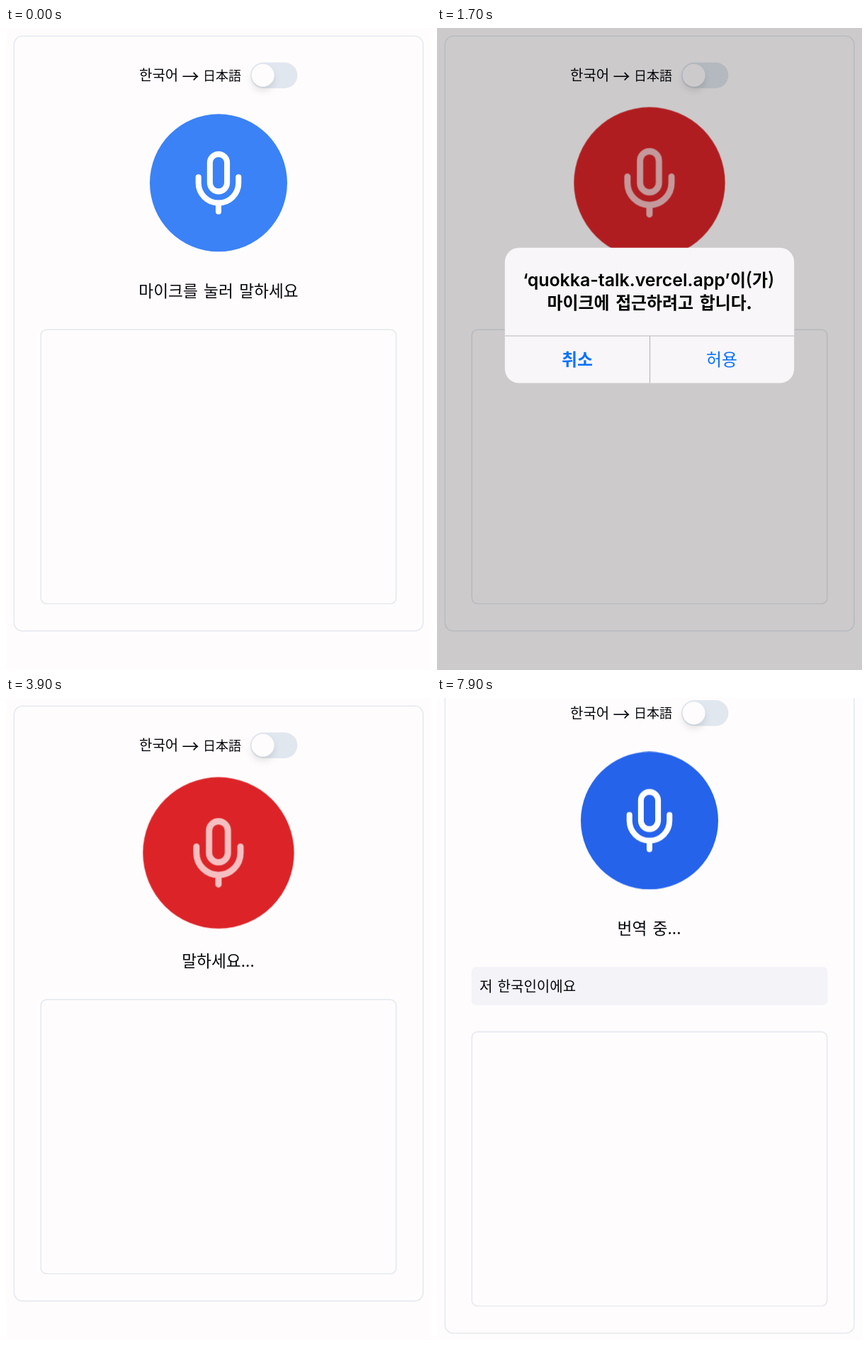
Animation, 600 px wide and 905 px high, one loop 8000 ms. Source, as an HTML page:

```html
<!DOCTYPE html>
<html lang="ko">
<head>
<meta charset="utf-8">
<title>Voice translator</title>
<style>
  html, body { margin: 0; width: 100%; height: 100%; overflow: hidden; background: #fffcfd; }
  svg { display: block; width: 600px; height: 905px; }
  text { font-family: "Noto Sans CJK KR", "Noto Sans KR", "Noto Sans CJK", "Noto Sans CJK JP", sans-serif; fill: #05060c; }
  .mid { text-anchor: middle; }
  .label { font-size: 20px; font-weight: 500; }
  .label-ja { font-size: 18px; font-weight: 500; }
  .arrow { font-size: 24px; }
  .status { font-size: 22.7px; word-spacing: 2px; }
  .words { font-size: 20px; word-spacing: 1.6px; }
  .frame { fill: none; stroke: #e2e7ee; stroke-width: 1.4; }
  .knob { filter: drop-shadow(0 6px 5px rgba(0, 0, 0, .1)); }

  .alert text { font-size: 23.9px; word-spacing: 2px; font-weight: 600; fill: #000; }
  .alert .host { font-family: Inter, sans-serif; font-size: 24.9px; }
  .alert .action { fill: #0a72ff; }
  .alert .plain { font-weight: 400; }
  .rule { stroke: #bab9be; stroke-width: 1.2; }

  /* One loop is 8 s, so 1% is 80 ms. */
  .page, .card, .result, .transcript, .late, .idle, .listening, .translating {
    animation: 8s step-end infinite;
  }
  .page { animation-name: rise; }
  .card { animation-name: grow; }
  .result { animation-name: push; }
  .transcript { animation-name: show-box; }
  .han { animation-name: show-han; }
  .gugin { animation-name: show-gugin; }
  .ending { animation-name: show-ending; }
  .idle { animation-name: idle; }
  .listening { animation-name: listening; }
  .translating { animation-name: translating; }
  .button { transform-origin: 300px 218.3px; animation: swell 8s ease infinite; }
  .disc { animation: tint 8s ease infinite; }
  .mic { animation: mic 8s ease infinite; }
  .dim { animation: fade 8s ease infinite; }
  .alert { transform-origin: 300px 405.2px; animation: fade 8s ease infinite, settle 8s ease infinite; }

  @keyframes rise { 0% { transform: none; } 52.5%, 100% { transform: translateY(-45.5px); } }
  @keyframes grow { 0% { height: 838.6px; } 52.5%, 100% { height: 929.6px; } }
  @keyframes push { 0% { transform: none; } 52.5%, 100% { transform: translateY(91px); } }
  @keyframes show-box { 0% { visibility: hidden; } 52.5%, 100% { visibility: visible; } }
  @keyframes show-han { 0% { visibility: hidden; } 55%, 100% { visibility: visible; } }
  @keyframes show-gugin { 0% { visibility: hidden; } 57.5%, 100% { visibility: visible; } }
  @keyframes show-ending { 0% { visibility: hidden; } 62.5%, 100% { visibility: visible; } }
  @keyframes idle {
    0%, 82.5% { visibility: visible; }
    12.5%, 86.25%, 100% { visibility: hidden; }
  }
  @keyframes listening {
    0%, 82.5%, 100% { visibility: hidden; }
    12.5% { visibility: visible; }
  }
  @keyframes translating { 0% { visibility: hidden; } 86.25%, 100% { visibility: visible; } }
  @keyframes swell {
    0%, 12.5%, 86.25%, 100% { transform: scale(1); }
    16.25%, 82.5% { transform: scale(1.1); }
  }
  @keyframes tint {
    0%, 8.75% { fill: #3b82f6; }
    11.25%, 12.5%, 86.25%, 100% { fill: #2563eb; }
    16.25%, 82.5% { fill: #dc2428; }
  }
  @keyframes mic {
    0%, 12.5%, 86.25%, 100% { stroke: #fff; }
    16.25%, 82.5% { stroke: #f5bfc1; }
  }
  @keyframes fade {
    0%, 15.75%, 31.4%, 100% { opacity: 0; }
    20.75%, 26.4% { opacity: 1; }
  }
  @keyframes settle {
    0%, 15.75% { transform: scale(1.2); }
    20.75%, 100% { transform: scale(1); }
  }
</style>
</head>
<body>
<svg viewBox="0 0 600 905">
  <rect width="600" height="905" fill="#fffcfd"/>

  <g class="page">
    <rect class="card frame" x="11.3" y="11.4" width="577.6" height="838.6" rx="12"/>

    <text class="label" x="188" y="74">한국어</text>
    <text class="arrow mid" x="260.5" y="77">→</text>
    <text class="label-ja" x="278" y="73.8" lang="ja">日本語</text>
    <rect x="345" y="48.5" width="66.4" height="36.5" rx="18.25" fill="#e1e7ef"/>
    <circle class="knob" cx="362.6" cy="66.8" r="16" fill="#fffcfd"/>

    <g class="button">
      <circle class="disc" cx="300" cy="218.3" r="97"/>
      <g class="mic" transform="translate(251.5 169.8) scale(4.04)" fill="none" stroke-width="2" stroke-linecap="round" stroke-linejoin="round">
        <rect x="9" y="2" width="6" height="13" rx="3"/>
        <path d="M19 10v2a7 7 0 0 1-14 0v-2M12 19v3"/>
      </g>
    </g>

    <text class="status mid idle" x="300" y="378.5">마이크를 눌러 말하세요</text>
    <text class="status mid listening" x="299.5" y="378.5">말하세요...</text>
    <text class="status mid translating" x="299.5" y="378.5">번역 중...</text>

    <g class="transcript">
      <rect x="48.5" y="424.5" width="503" height="54" rx="7" fill="#f3f3f8"/>
      <text class="words" x="60" y="459">저<tspan class="late han"> 한</tspan><tspan class="late gugin">국인</tspan><tspan class="late ending">이에요</tspan></text>
    </g>

    <g class="result">
      <rect class="frame" x="49.2" y="425.2" width="501.6" height="386.4" rx="8"/>
    </g>
  </g>

  <rect class="dim" width="600" height="905" fill="#000" fill-opacity=".2"/>

  <g class="alert">
    <rect x="95.8" y="309.8" width="408.4" height="190.8" rx="20" fill="#f8f6f8"/>
    <path class="rule" d="M95.8 434H504.2M300.5 434V500.6"/>
    <text class="host mid" x="267.5" y="364">‘quokka-talk.vercel.app’</text>
    <text class="mid" x="445" y="364">이(가)</text>
    <text class="mid" x="300" y="396">마이크에 접근하려고 합니다.</text>
    <text class="action mid" x="198" y="476">취소</text>
    <text class="action plain mid" x="402" y="476">허용</text>
  </g>
</svg>
</body>
</html>
```
